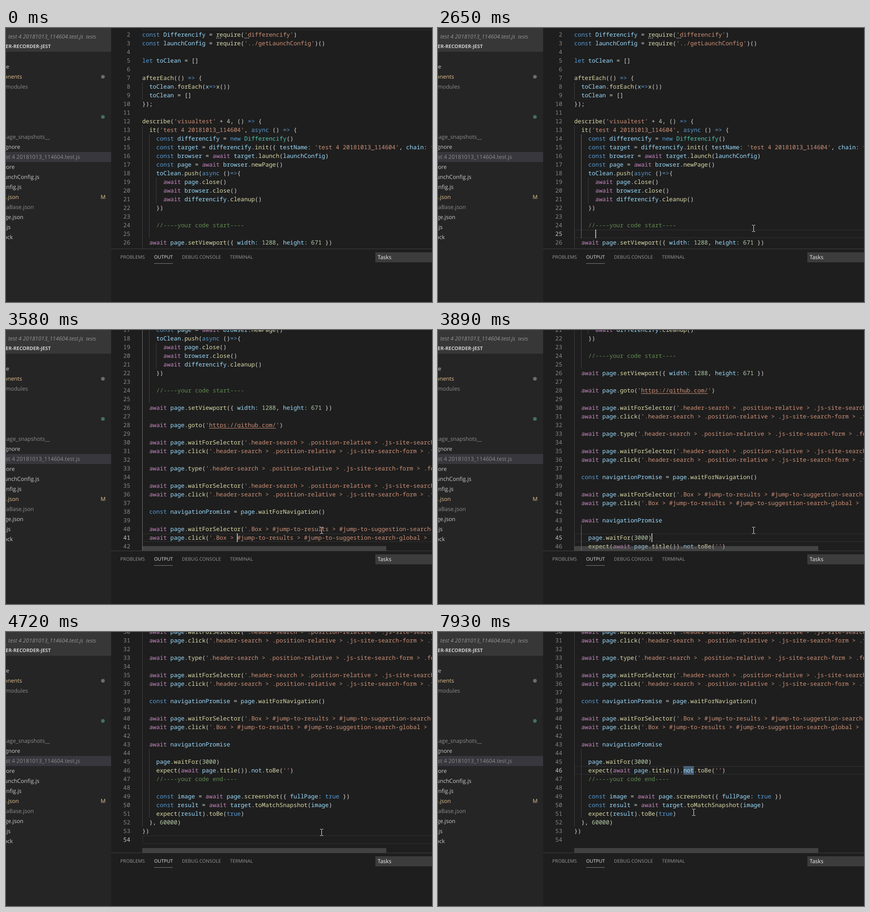
These frames come from a looping animation (932x601 px, 8 s). An HTML page:

```html
<!DOCTYPE html>
<html lang="en">
<head>
<meta charset="utf-8">
<title>Editor</title>
<style>
html, body { margin: 0; width: 100%; height: 100%; overflow: hidden; background: #1e1e1e; }
#stage { position: relative; width: 932px; height: 601px; overflow: hidden; background: #1e1e1e;
  font: 12.15px/22px "Open Sans", "Noto Sans", sans-serif; color: #ccc; white-space: pre; text-rendering: geometricPrecision; }
#stage div, #stage svg { position: absolute; }

#side { left: 0; top: 0; width: 230px; height: 601px; background: #252526; overflow: hidden; }
#head { width: 230px; height: 52px; background: #373738; }
#row { top: 272px; width: 230px; height: 22px; background: #37373d; }
.bold { font-weight: bold; font-size: 10.8px; }
.dim { color: #8c8c8c; }
.mod { color: #e2c08d; }
.it { font-style: italic; color: #949494; }
.dot { left: 208px; width: 8px; height: 8px; border-radius: 50%; }

#editor { left: 230px; top: 0; width: 702px; height: 484px; overflow: hidden; }
#doc { left: 68px; top: 0; font: 12.83px/19px "Noto Sans Mono", "DejaVu Sans Mono", monospace; color: #d4d4d4; }
.num { right: 26px; color: #858585; }
.num.on { color: #c6c6c6; }
.guide { width: 1px; height: 19px; background: #404040; }
.guide.on { background: #707070; }
#active { left: 0; width: 640px; height: 19px; box-sizing: border-box; border: 2px solid #282828; border-right: 0; }
.mark { height: 19px; }
.match { box-sizing: border-box; border: 1px solid #888; background: rgba(0,100,0,.1); }
#caret { width: 2px; height: 19px; background: #aeafad; }
.hint { width: 10px; height: 2px; background: repeating-linear-gradient(90deg, #999 0 2px, transparent 2px 4px); }
#bar { left: 68px; top: 474px; width: 534px; height: 10px; background: rgba(121,121,121,.4); }
#hover { left: 337px; top: 216px; width: 500px; height: 76px; background: #252526; border: 1px solid #454545; }
#hover div { left: 8px; }
.comment { color: #608b4e; } .str { color: #ce9178; } .key { color: #569cd6; } .ctl { color: #c586c0; }
.lit { color: #b5cea8; } .type { color: #4ec9b0; } .fn { color: #dcdcaa; } .id { color: #9cdcfe; }
u { text-underline-offset: 2px; text-decoration-thickness: 1px; }

#panel { left: 230px; top: 484px; width: 702px; height: 117px; background: #1e1e1e; border-top: 1px solid #414141;
  box-sizing: border-box; font-size: 10.4px; color: #979797; }
#panel div { top: 7px; }
#panel .tab { color: #e7e7e7; height: 24px; border-bottom: 1px solid #808080; }
#panel .select { left: 578px; width: 124px; height: 22px; text-indent: 5px; background: #3c3c3c; color: #f0f0f0; font-size: 12px; }
</style>
</head>
<body>
<div id="stage">
  <div id="side"><div id="head"></div><div id="row"></div></div>
  <div id="editor"><div id="doc"></div><div id="bar"></div><div id="hover"></div></div>
  <div id="panel"><div style="left:20px">PROBLEMS</div><div class="tab" style="left:94px">OUTPUT</div><div style="left:155px">DEBUG CONSOLE</div><div style="left:260px">TERMINAL</div><div class="select">Tasks</div></div>
  <svg id="mouse" width="9" height="18" fill="none" stroke="#f2f2f2"><path d="M1 1.5H3.5L4.5 2.5L5.5 1.5H8M4.5 2V15M1 15.5H3.5L4.5 14.5L5.5 15.5H8"/></svg>
</div>
<script>
const code = `
const Differencify = require('differencify')
const launchConfig = require('../getLaunchConfig')()

let toClean = []

afterEach(() => {
  toClean.forEach(x=>x())
  toClean = []
});

describe('visualtest' + 4, () => {
  it('test 4 20181013_114604', async () => {
    const differencify = new Differencify()
    const target = differencify.init({ testName: 'test 4 20181013_114604', chain: false })
    const browser = await target.launch(launchConfig)
    const page = await browser.newPage()
    toClean.push(async ()=>{
      await page.close()
      await browser.close()
      await differencify.cleanup()
    })

    //----your code start----
      
  await page.setViewport({ width: 1288, height: 671 })
  
  await page.goto('https://github.com/')
  
  await page.waitForSelector('.header-search > .position-relative > .js-site-search-form
  await page.click('.header-search > .position-relative > .js-site-search-form > .form-control
  
  await page.type('.header-search > .position-relative > .js-site-search-form > .form-control
  
  await page.waitForSelector('.header-search > .position-relative > .js-site-search-form
  await page.click('.header-search > .position-relative > .js-site-search-form > .form-control
  
  const navigationPromise = page.waitForNavigation()
  
  await page.waitForSelector('.Box > #jump-to-results > #jump-to-suggestion-search-global
  await page.click('.Box > #jump-to-results > #jump-to-suggestion-search-global > .d-flex
  
  await navigationPromise

    page.waitFor(3000)
    expect(await page.title()).not.toBe('')
    //----your code end----

    const image = await page.screenshot({ fullPage: true })
    const result = await target.toMatchSnapshot(image)
    expect(result).toBe(true)
  }, 60000)
})
`.split('\n');

const CH = 7.697, LH = 19, LOOP = 8000;
const $ = id => document.getElementById(id);
const doc = $('doc');

function add(parent, cls, style, html = '') {
  const el = document.createElement('div');
  el.className = cls;
  el.style.cssText = style;
  el.innerHTML = html;
  parent.append(el);
  return el;
}

// Sidebar: row index, right edge of the label, label, class
[[0, 7, 'code', ''], [1, 35, 'components', 'mod'], [2, 48, 'node_modules', 'dim'], [7, 96, '__image_snapshots__', 'dim'],
 [8, 31, '.gitignore', ''], [9, 162, 'test 4 20181013_114604.test.js', 'dim'], [10, 19, '.npmignore', ''],
 [11, 73, 'getLaunchConfig.js', ''], [12, 34, 'config.js', ''], [13, 28, 'main.json', 'mod'], [14, 61, 'dataBase.json', 'dim'],
 [15, 38, 'package.json', ''], [16, 10, 'index.js', ''], [17, 15, 'yarn.lock', ''], [13, 218, 'M', 'mod'],
 [-3, 169, 'test 4 20181013_114604.test.js', 'it'], [-2, 98, 'PUPPETEER-RECORDER-JEST', 'bold'], [-4, 27, 'OPEN EDITORS', 'bold']
].forEach(([i, end, text, cls]) => add($('side'), cls, `top:${74 + 22 * i}px;right:${230 - end}px`, text));
add($('side'), 'it', 'left:175px;top:9px;font-size:11px', 'tests');
add($('side'), 'dot', 'top:103px;background:#6c6c6a');
add($('side'), 'dot', 'top:191px;background:#45705b');

// Syntax colours, one group per class
const kinds = ['comment', 'str', 'key', 'ctl', 'lit', 'type', 'fn', 'id'];
const syntax = /(\/\/-.*)|('[^']*'?)|(\b(?:const|let|new|async|true|false)\b|=>)|(\bawait\b)|(\b\d+)|(Differencify(?=\())|(\w+(?=\())|(\w+:?)/g;
const paint = s => s.replace(syntax, (m, ...groups) => {
  const kind = kinds[groups.findIndex(g => g !== undefined)];
  return `<span class="${kind}">${m.replace(/https[^']*/, '<u>$&</u>')}</span>`;
});

// Indent depth; an empty line takes it from its neighbours
const indent = s => s.trim() ? s.search(/\S/) / 2 : -1;
const levels = code.map((s, i) => {
  if (s.trim()) return indent(s);
  let a = i, b = i;
  while (a >= 0 && indent(code[a]) < 0) a--;
  while (b < code.length && indent(code[b]) < 0) b++;
  if (a < 0 || b === code.length) return 0;
  const up = indent(code[a]), down = indent(code[b]);
  return up === down ? up : Math.min(up, down) + 1;
});

const active = add(doc, '', '');
active.id = 'active';
const mark = (line, from, to, cls = '') =>
  add(doc, 'mark ' + cls, `top:${(line - 1) * LH}px;left:${from * CH}px;width:${(to - from) * CH}px`);
const brackets = [mark(20, 25, 26, 'match'), mark(20, 26, 27, 'match')];
const toBe = mark(46, 35, 39), not = mark(46, 31, 34);
toBe.style.background = '#202a35';

const guides = [], nums = [];
code.forEach((s, i) => {
  const top = `top:${i * LH}px;`;
  for (let k = 0; k < levels[i]; k++)
    guides.push({ i, k, el: add(doc, 'guide', top + `left:${Math.floor(k * 2 * CH)}px`) });
  nums.push(add(doc, 'num', top, i + 1));
  add(doc, '', top + 'left:0', paint(s));
});
add(doc, 'hint', 'left:162px;top:35px');
add(doc, 'hint', 'left:224px;top:35px');
const caret = add(doc, '', '');
caret.id = 'caret';

add($('hover'), '', 'top:4px;font:12.83px/19px "Noto Sans Mono",monospace',
  paint('(method) jest.Matchers&lt;void&gt;.toBe(expected: any): void'));
add($('hover'), '', 'top:32px;line-height:18px',
  'Checks that a value is what you expect. It uses === to check strict\nequality. Don\'t use toBe with floating-point numbers.');

// Timelines: [time, value...], held until the next entry
const lineAt = [[0, 1], [930, 20], [2320, 21], [2560, 22], [2650, 25], [2730, 27], [2810, 29], [2890, 32], [2970, 34],
  [3040, 37], [3120, 40], [3580, 41], [3810, 42], [3890, 45], [3970, 47], [4040, 49], [4130, 52], [4200, 54], [7150, 46]];
const blink = [[0, 0], [930, 1], [1390, 0], [1940, 1], [4720, 0], [5210, 1], [5680, 0], [6140, 1], [6690, 0], [7150, 1], [7930, 0]];
const mouseAt = [[0, -50, -50], [450, 761, 484], [520, 705, 385], [600, 684, 351],
  [5460, 672, 335], [5530, 632, 295], [5610, 590, 260], [5680, 573, 250],
  [5910, 573, 258], [5990, 575, 282], [6070, 577, 304], [6140, 578, 314],
  [6850, 570, 312], [6930, 558, 308], [7000, 553, 307]];
const at = (list, t) => list.findLast(e => e[0] <= t);
const show = (el, on) => { el.style.visibility = on ? 'visible' : 'hidden'; };

function draw(t) {
  const line = at(lineAt, t)[1], i = line - 1;
  const selected = t >= 7460;
  const col = line === 46 && t >= 7150 ? (selected ? 34 : 33) : Math.min(27, code[i].length);
  const peak = t >= 7150 ? 54 : line;
  doc.style.transform = `translateY(${-Math.max(14, peak * LH - 465)}px)`;
  active.style.top = caret.style.top = i * LH + 'px';
  caret.style.left = Math.floor(col * CH) + 'px';
  show(caret, at(blink, t)[1]);
  nums.forEach((n, j) => n.classList.toggle('on', j === i));

  const depth = levels[i];
  let a = i, b = i;
  while (a > 0 && levels[a - 1] >= depth) a--;
  while (b < code.length - 1 && levels[b + 1] >= depth) b++;
  guides.forEach(g => g.el.classList.toggle('on', !selected && g.k === depth - 1 && g.i >= a && g.i <= b));

  brackets.forEach(m => show(m, line === 20));
  show(toBe, t >= 6540 && t < 6850);
  show(not, selected);
  not.style.background = t < 7700 ? '#264f78' : '#495f74';
  show($('bar'), t >= 2730);
  show($('hover'), t >= 6610 && t < 6850);
  $('hover').style.opacity = t < 6690 ? .6 : 1;
  $('row').style.background = t >= 850 && t < 930 ? '#094771' : '#37373d';
  const [, x, y] = at(mouseAt, t);
  $('mouse').style.transform = `translate(${x - 4}px,${y - 8}px)`;
}

const start = performance.now();
function tick() {
  draw((performance.now() - start) % LOOP);
  requestAnimationFrame(tick);
}
tick();
</script>
</body>
</html>
```
